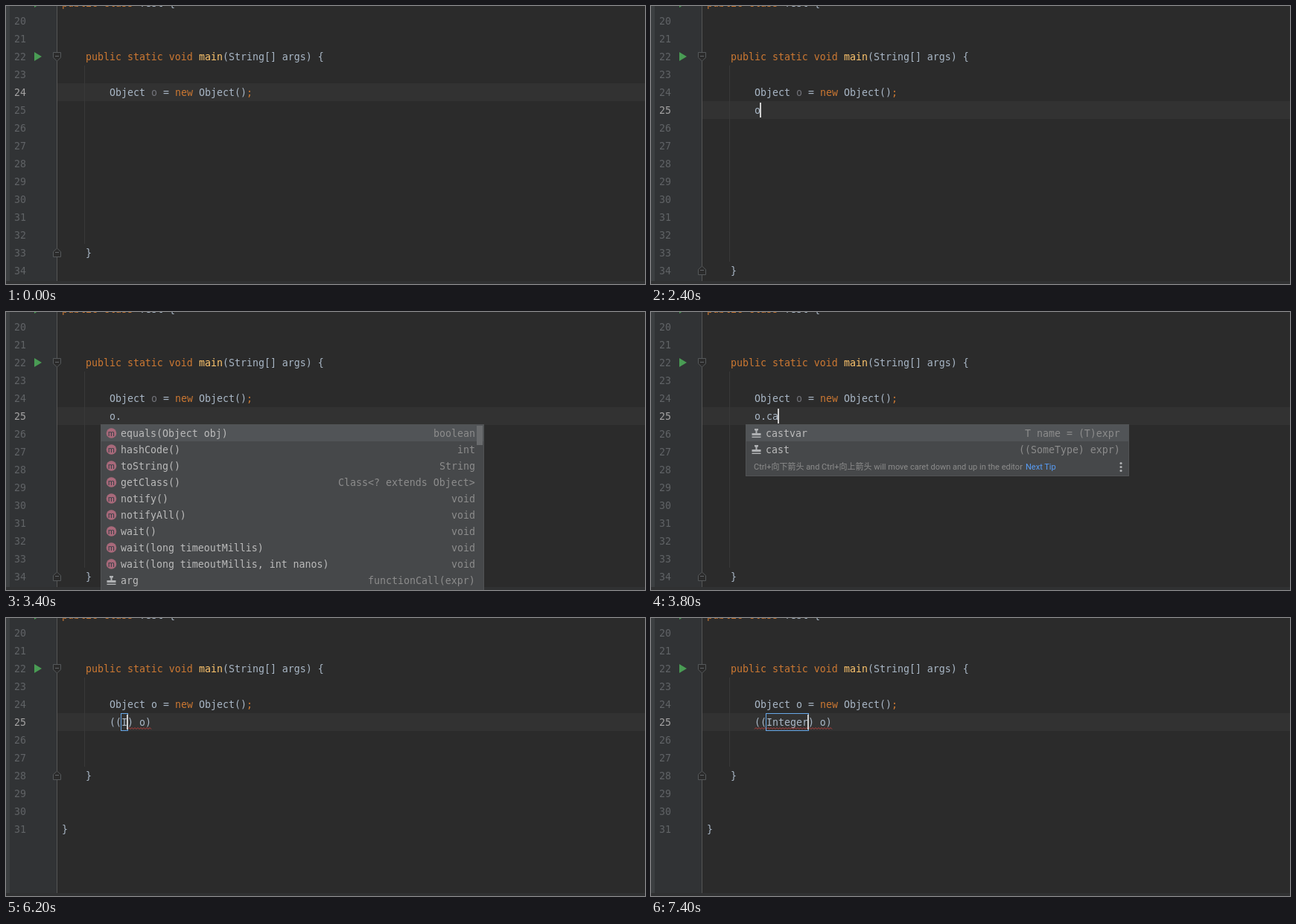
An HTML page for the animation above (8 s loop, 858 by 374 pixels).

```html
<!DOCTYPE html>
<html lang="en">
<head>
<meta charset="utf-8">
<title>Postfix cast</title>
<style>
  html, body { margin: 0; width: 100%; height: 100%; overflow: hidden; background: #2b2b2b; }
  svg { display: block; width: 858px; height: 374px; }
  text { white-space: pre; font: 13.288px "DejaVu Sans Mono", "Noto Sans Mono", monospace; fill: #a9b7c6; }
  .kw { fill: #cc7832; }
  .fn { fill: #ffc66d; }
  .unused { fill: #72737a; }
  .num { fill: #606366; }
  .now { fill: #a4a3a3; }
  .item { fill: #bbbbbb; }
  .hit { fill: #589df6; }
  .dim { fill: #8c8c8c; }
  .tip { font: 11px Roboto, "Noto Sans CJK SC", "Noto Sans CJK", sans-serif; }
  .glyph { font: 10px Roboto, sans-serif; fill: #2b3a40; text-anchor: middle; }
</style>
</head>
<body>
<svg id="stage" viewBox="0 0 858 374"></svg>
<script>
const LOOP = 8000, CH = 8, LINE = 24, ROW = 22, CODE_X = 139;
const stage = document.getElementById('stage');

const lineTop = n => 104 + (n - 24) * LINE;
const colX = c => CODE_X + c * CH;
const esc = s => s.replace(/&/g, '&amp;').replace(/</g, '&lt;');
const rect = (x, y, w, h, fill, more = '') =>
  `<rect x="${x}" y="${y}" width="${w}" height="${h}" fill="${fill}" ${more}/>`;
const path = (d, fill, stroke = 'none') => `<path d="${d}" fill="${fill}" stroke="${stroke}"/>`;
const label = (x, y, s, cls = '') => `<text x="${x}" y="${y}" class="${cls}">${esc(s)}</text>`;

// Monospaced runs: [text, class] pairs laid out one after another.
function runs(x, y, parts) {
  let out = '';
  for (const [s, cls] of parts) {
    out += label(x, y, s, cls);
    x += s.length * CH;
  }
  return out;
}
const code = (x, n, parts) => runs(x, lineTop(n) + 17, parts);

const lists = {
  name: { x: 111, hit: 'o', tip: true, rows: ['v|o||Object', 'C|Object|java.lang|'] },
  members: { x: 127, rows: [
    'm|equals(Object obj)||boolean', 'm|hashCode()||int', 'm|toString()||String',
    'm|getClass()||Class<? extends Object>', 'm|notify()||void', 'm|notifyAll()||void',
    'm|wait()||void', 'm|wait(long timeoutMillis)||void',
    'm|wait(long timeoutMillis, int nanos)||void', 't|arg||functionCall(expr)'] },
  cast: { x: 127, tip: true, rows: ['t|castvar||T name = (T)expr', 't|cast||((SomeType) expr)'] },
  typeI: { x: 127, hit: 'I', rows: [
    'F|Integer|java.lang|', 'C|Iterable<T>|java.lang|', 'E|IllegalAccessError|java.lang|',
    'E|IllegalStateException|java.lang|', 'E|InstantiationError|java.lang|', 'E|InternalError|java.lang|',
    'F|Instant|java.time|', 'E|InterruptedException|java.lang|',
    'E|IllegalAccessException|java.lang|', 'E|InstantiationException|java.lang|'] },
  typeI2: { x: 127, hit: 'I', rows: [
    'F|Integer|java.lang|', 'E|IncompatibleClassChangeError|java.lang|',
    'E|IllegalArgumentException|java.lang|', 'E|IndexOutOfBoundsException|java.lang|',
    'C|Iterable<T>|java.lang|', 'E|IllegalStateException|java.lang|',
    'E|InstantiationError|java.lang|', 'C|InheritableThreadLocal<T>|java.lang|',
    'F|Instant|java.time|', 'E|IllegalAccessError|java.lang|'] },
  typeIn: { x: 127, hit: 'In', rows: [
    'F|Integer|java.lang|', 'E|IncompatibleClassChangeError|java.lang|', 'F|String|java.lang|',
    'E|IndexOutOfBoundsException|java.lang|', 'E|InstantiationError|java.lang|',
    'C|InheritableThreadLocal<T>|java.lang|', 'F|Instant|java.time|',
    'E|InstantiationException|java.lang|', 'E|InternalError|java.lang|',
    'E|InterruptedException|java.lang|'] }
};

// Each step overrides part of the state before it.
const steps = [
  [0, { row: 24, text: '', col: 24, caret: false, end: 33, last: 34, list: '', sel: 0,
        box: -1, used: false, mark: false, wave: null }],
  [700, { caret: true }],
  [1500, { row: 25, col: 0, end: 34 }],
  [2000, { caret: false }],
  [2400, { text: 'o', col: 1, caret: true }],
  [2500, { list: 'name' }],
  [2600, { mark: true }],
  [2800, { text: 'o.', col: 2, list: '', mark: false }],
  [3000, { list: 'members' }],
  [3400, { caret: false }],
  [3700, { text: 'o.c', col: 3, caret: true }],
  [3800, { text: 'o.ca', col: 4, list: 'cast' }],
  [4300, { caret: false }],
  [4600, { sel: 1 }],
  [4800, { text: '(() o)', col: 2, caret: true, list: '', sel: 0 }],
  [4900, { end: 28, last: 31, box: 0 }],
  [5300, { used: true, wave: [2, 6] }],
  [6200, { text: '((I) o)', col: 3, box: 1, wave: [3, 7] }],
  [6400, { list: 'typeI' }],
  [6600, { list: 'typeI2' }],
  [6900, { text: '((In) o)', col: 4, box: 2, wave: [4, 8] }],
  [7000, { list: 'typeIn' }],
  [7100, { text: '((Integer) o)', col: 9, box: 7, wave: [9, 13], list: '' }],
  [7400, { wave: [0, 13] }]
];
let merged = {};
const states = steps.map(([at, change]) => (merged = { ...merged, ...change, at }));

function foldMark(n, down) {
  const y = lineTop(n) + 12, k = down ? 1 : -1;
  return path(`M63.5 ${y - 5.5 * k}h10v${7 * k}l-5 ${4.5 * k}l-5 ${-4.5 * k}z`, '#2b2b2b', '#55585a') +
    path(`M66 ${y - 0.5}h5`, 'none', '#606366');
}

function wave([from, to]) {
  const end = colX(to);
  let d = `M${colX(from)} 149.5`;
  for (let x = colX(from) + 2, up = true; x <= end; x += 2, up = !up) d += `L${x} ${up ? 147.5 : 149.5}`;
  return path(d, 'none', '#bc3f3c');
}

function icon(kind, x, y) {
  if (kind === 't') {
    return path(`M${x - 2.5} ${y - 6}h5v2l-1.5 1v3h5v3h-12v-3h5v-3l-1.5 -1z` +
      `M${x - 6} ${y + 4.5}h12v1.5h-12z`, '#afb1b3');
  }
  const tint = { m: '#a8697a', v: '#a8697a' }[kind] || '#3e86a0';
  let out = `<circle cx="${x}" cy="${y}" r="6.8" fill="${tint}"/>`;
  if (kind === 'E') out += path(`M${x + 1} ${y - 4.5}l-4 5h2.6l-1 4l4.4 -5.2h-2.8z`, '#2b3a40');
  else out += label(x, y + 3.6, kind === 'F' ? 'C' : kind, 'glyph');
  if (kind === 'F') out += path(`M${x - 7} ${y - 7}h5l-5 5z`, '#9aa7b0');
  return out;
}

function popup({ x, rows, hit = '', tip }, sel) {
  const bottom = tip ? 221 : 376;
  let out = rect(x + 0.5, 151.5, 514, bottom - 152, '#46484a', 'stroke="#515355"') +
    rect(x + 1, 152 + sel * ROW, 513, ROW, '#515457');
  rows.forEach((entry, i) => {
    const [kind, name, tail, right] = entry.split('|');
    const y = 168 + i * ROW;
    const at = hit ? name.toLowerCase().indexOf(hit.toLowerCase()) : 0;
    const stop = at + hit.length;
    const generic = name.endsWith('<T>') ? name.length - 3 : name.length;
    out += icon(kind, x + 14.5, y - 5) + runs(x + 27, y, [
      [name.slice(0, at), 'item'], [name.slice(at, stop), 'hit'],
      [name.slice(stop, generic), 'item'], [name.slice(generic), 'dim'], [' ' + tail, 'dim']
    ]) + label(x + 503 - right.length * CH, y, right, 'dim');
  });
  if (tip) {
    out += label(x + 11, 212, 'Ctrl+向下箭头 and Ctrl+向上箭头 will move caret down and up in the editor', 'tip dim') +
      label(x + 376, 212, 'Next Tip', 'tip hit');
    for (const y of [203.5, 208.5, 213.5]) out += `<circle cx="${x + 504}" cy="${y}" r="1.6" fill="#afb1b3"/>`;
  } else {
    out += rect(x + 505, 153, 8, 26, '#696b6d');
  }
  return out;
}

function scene(s) {
  const top = lineTop(s.row);
  let out = rect(0, 0, 858, 374, '#2b2b2b') + rect(0, 0, 68, 374, '#313335') +
    rect(0, 0, 5, 374, '#3c3f41') + rect(69, top, 789, LINE, '#323232') +
    rect(68, 0, 1, 374, '#555555') + rect(105, 80, 1, lineTop(s.end) - 80, '#393939');
  for (let n = 20; n <= s.last; n++) {
    out += label(11, lineTop(n) + 17, String(n), n === s.row ? 'now' : 'num');
  }
  out += path('M38 62l10 6l-10 6z', '#499c54') + path('M38 -10l10 6l-10 6z', '#499c54') +
    foldMark(22, true) + foldMark(s.end, false);
  if (s.mark) out += rect(195, 104, CH, LINE, '#40332b') + rect(139, 128, CH, LINE, '#344134');

  out += code(75, 19, [['public class ', 'kw'], ['Test {', '']]) +
    code(107, 22, [['public static void ', 'kw'], ['main', 'fn'], ['(String[] args) {', '']]) +
    code(CODE_X, 24, [['Object ', ''], ['o', s.used ? '' : 'unused'], [' = ', ''], ['new ', 'kw'],
      ['Object()', ''], [';', 'kw']]) +
    code(CODE_X, 25, [[s.text, '']]) + code(107, s.end, [['}', '']]);
  if (s.last === 31) out += code(75, 31, [['}', '']]);

  if (s.wave) out += wave(s.wave);
  if (s.box >= 0) out += rect(154.5, 128.5, s.box * CH + 1, 23, 'none', 'stroke="#68a8e8"');
  if (s.caret) out += rect(colX(s.col) - 1, top + 2, 2, 20, '#d0d0d0');
  out += rect(0, 370, 858, 4, '#303132');
  if (s.list) out += popup(lists[s.list], s.sel);
  return out;
}

let shown = null;
function tick() {
  const t = performance.now() % LOOP;
  const state = states.findLast(s => s.at <= t);
  if (state !== shown) {
    shown = state;
    stage.innerHTML = scene(state);
  }
  requestAnimationFrame(tick);
}
tick();
</script>
</body>
</html>
```
